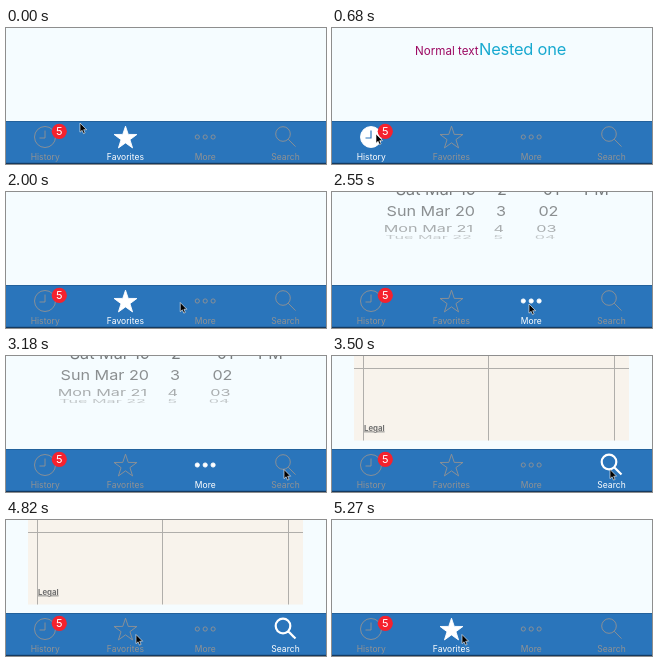
An HTML page that plays this animation: 320 by 136 pixels, repeating every 6600 ms.

```html
<!DOCTYPE html>
<html lang="en">
<head>
<meta charset="utf-8">
<title>Tab bar demo</title>
<style>
  html, body { margin: 0; width: 100%; height: 100%; overflow: hidden; background: #f5fcff; }
  svg { display: block; width: 100%; height: 100%; font-family: Inter, Roboto, sans-serif; }
  .tab { --tint: #929292; }
  .tab.on { --tint: #fff; }
  .tab text { font-size: 8.5px; letter-spacing: .05px; text-anchor: middle; fill: var(--tint); }
  .icon { fill: none; stroke: var(--tint); stroke-width: .9; }
  .on .solid { fill: #fff; }
  .on .hands { stroke: #2a75bb; stroke-width: 1.2; }
  .on .lens { stroke-width: 2.2; }
  .page { visibility: hidden; }
  .page.on { visibility: visible; }
  .wheel { font-size: 16.2px; }
</style>
</head>
<body>
<svg viewBox="0 0 320 136" preserveAspectRatio="none">
  <rect width="320" height="136" fill="#f5fcff"/>

  <g class="page" data-tab="history">
    <text x="83" y="27" font-size="11.6" fill="#9c0862">Normal text</text>
    <text x="147" y="27" font-size="16.4" letter-spacing="-.2" fill="#17a9d0">Nested one</text>
  </g>

  <g class="page wheel" data-tab="more"></g>

  <g class="page" data-tab="search">
    <rect x="22" width="275" height="84.5" fill="#f8f3ec"/>
    <path d="M31.5 0V84.5M156.5 0V84.5M282.5 0V84.5M22 12.5H297" stroke="#b0aeab" fill="none"/>
    <text x="32" y="74.5" font-size="7.8" font-weight="700" fill="#707070" text-decoration="underline">Legal</text>
  </g>

  <rect y="93" width="320" height="42" fill="#2a75bb"/>
  <rect y="93" width="320" height=".6" fill="#1d5487"/>
  <rect y="134.8" width="320" height="1.2" fill="#143a60"/>

  <g class="tab" data-tab="history">
    <g class="icon">
      <circle class="solid" cx="39" cy="109" r="10.5"/>
      <path class="hands" d="M39 102.5V110H33.5"/>
    </g>
    <text x="39.2" y="132">History</text>
  </g>
  <circle cx="53.3" cy="103.3" r="7.6" fill="#f5222e"/>
  <text x="53.3" y="107.3" font-size="11" text-anchor="middle" fill="#fff">5</text>

  <g class="tab" data-tab="favorites">
    <path id="star" class="icon solid"/>
    <text x="119.4" y="132">Favorites</text>
  </g>

  <g class="tab" data-tab="more">
    <g class="icon">
      <circle class="solid" cx="191.3" cy="109" r="2.1"/>
      <circle class="solid" cx="199.2" cy="109" r="2.1"/>
      <circle class="solid" cx="207.1" cy="109" r="2.1"/>
    </g>
    <text x="199.3" y="132">More</text>
  </g>

  <g class="tab" data-tab="search">
    <path class="icon lens" d="M284.3 106A7.3 7.3 0 1 1 269.7 106A7.3 7.3 0 1 1 284.3 106M282.2 111.2L289.5 118.6"/>
    <text x="279.5" y="132">Search</text>
  </g>

  <path id="cursor" d="M0 0V9.2L2.1 7.3L3.5 10.6L5.1 9.9L3.7 6.7H6.6Z" fill="#000" stroke="#fff" stroke-width=".6"/>
</svg>
<script>
const LOOP = 6600;

// [time, selected tab]
const taps = [
  [0, 'favorites'], [330, 'history'], [1500, 'favorites'],
  [2310, 'more'], [3450, 'search'], [4870, 'favorites']
];

const linear = k => k, easeIn = k => k * k, easeOut = k => k * (2 - k);
const easeInOut = k => k * k * (3 - 2 * k);

// [time, x, y, easing towards the next point]
const path = [
  [0, 74, 95, linear], [50, 74, 95, easeOut], [230, 44, 106, linear],
  [800, 44, 106, easeInOut], [1230, 115, 111.5, linear],
  [1720, 115, 111.5, easeIn], [2000, 174, 110.5, easeOut], [2180, 197, 112, linear],
  [2750, 197, 112, easeInOut], [3130, 278, 113.5, linear],
  [4040, 278, 113.5, easeIn], [4270, 173.5, 114, easeOut], [4480, 130, 114.5, linear],
  [LOOP, 130, 114.5, linear]
];

const svg = document.querySelector('svg');
const cursor = document.getElementById('cursor');

function buildStar(cx, cy, radius) {
  const points = Array.from({ length: 10 }, (_, i) => {
    const r = i % 2 ? radius * .39 : radius;
    const a = (i / 5 - .5) * Math.PI;
    return (cx + r * Math.cos(a)).toFixed(2) + ' ' + (cy + r * Math.sin(a)).toFixed(2);
  });
  document.getElementById('star').setAttribute('d', 'M' + points.join('L') + 'Z');
}

function addText(parent, text, x, y, squash, anchor, fill) {
  const el = document.createElementNS(svg.namespaceURI, 'text');
  el.textContent = text;
  el.setAttribute('transform', `translate(${x} ${y}) scale(1 ${squash})`);
  el.setAttribute('text-anchor', anchor);
  el.setAttribute('fill', fill);
  parent.append(el);
}

// Wheel rows get flatter and paler towards the lower edge.
function buildWheel() {
  const wheel = document.querySelector('.wheel');
  const rows = [
    ['Sat Mar 19', '2', '01', 144, 2.5, .97, '#777b7d'],
    ['Sun Mar 20', '3', '02', 143, 24, .85, '#8b8f91'],
    ['Mon Mar 21', '4', '03', 141, 39.5, .58, '#a9adaf'],
    ['Tue Mar 22', '5', '04', 140, 46.5, .3, '#c3c8ca']
  ];
  for (const [day, hour, minute, right, y, squash, fill] of rows) {
    addText(wheel, day, right, y, squash, 'end', fill);
    addText(wheel, hour, right + 31, y, squash, 'end', fill);
    addText(wheel, minute, right + 83.5, y, squash, 'end', fill);
  }
  addText(wheel, 'PM', 252, 2.5, .97, 'start', rows[0][6]);
}

const parts = [...document.querySelectorAll('[data-tab]')];

function render(t) {
  const current = taps.findLast(([time]) => time <= t)[1];
  parts.forEach(el => el.classList.toggle('on', el.dataset.tab === current));

  const i = path.findLastIndex(([time]) => time <= t);
  const [t0, x0, y0, ease] = path[i];
  const [t1, x1, y1] = path[i + 1];
  const k = ease((t - t0) / (t1 - t0));
  cursor.setAttribute('transform', `translate(${x0 + (x1 - x0) * k} ${y0 + (y1 - y0) * k})`);
}

buildStar(119.5, 110.2, 12);
buildWheel();

const start = performance.now();
function tick() {
  render((performance.now() - start) % LOOP);
  requestAnimationFrame(tick);
}
tick();
</script>
</body>
</html>
```
